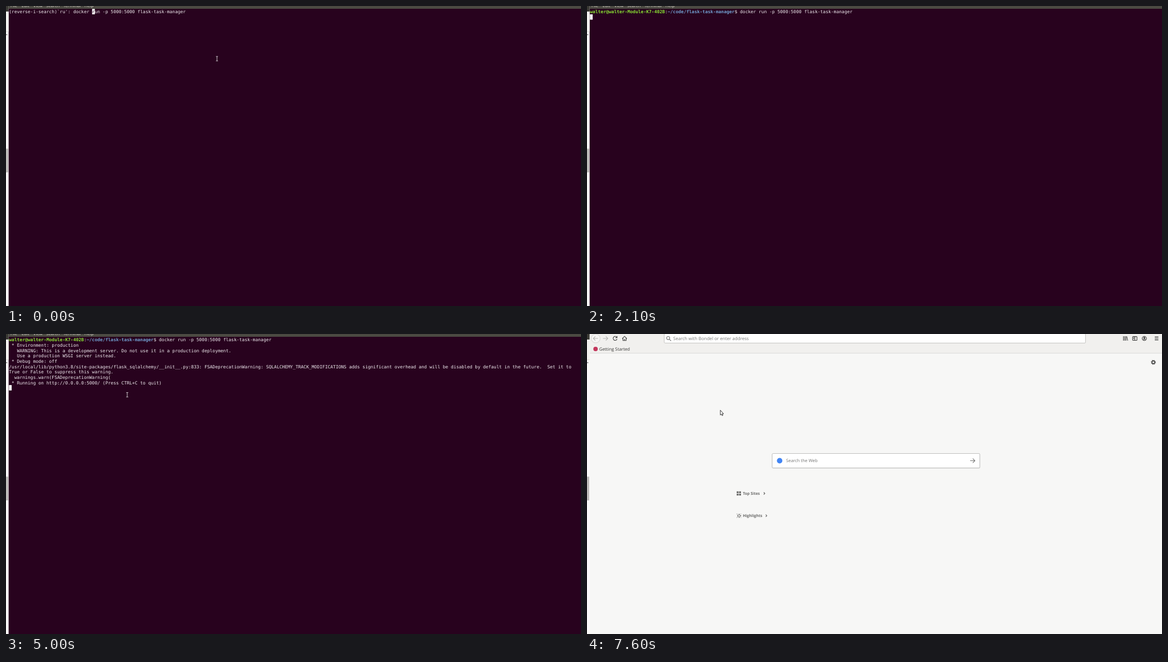
Recreate the animation shown at these times as an HTML page. Size 1034 px wide and 541 px high, loop 8000 ms.

```html
<!DOCTYPE html>
<html lang="en">
<head>
<meta charset="utf-8">
<title>Starting a container</title>
<style>
  html, body { margin: 0; width: 100%; height: 100%; overflow: hidden; background: #28021e; }
  svg { display: block; width: 1034px; height: 541px; }
  text { white-space: pre; text-rendering: geometricPrecision; }
  .ui { font-family: "Open Sans", "Noto Sans", sans-serif; }
  #rows, #under { font: 8.01px "DejaVu Sans Mono", "Liberation Mono", monospace; fill: #f0ecef; }
  #under { fill: #28021e; }
  .user { fill: #8ae234; font-weight: bold; }
  .path { fill: #729fcf; font-weight: bold; }
  .icon { fill: none; stroke: #3d3d3c; stroke-width: 1.1; }
  .dim { stroke: #b5b4b2; }
</style>
</head>
<body>
<svg viewBox="0 0 1034 541" xmlns="http://www.w3.org/2000/svg">
  <g id="terminal">
    <rect width="1034" height="541" fill="#28021e"/>
    <rect width="1034" height="5" fill="#4b4a42"/>
    <g id="menu" class="ui" font-size="7.7" fill="#dfdbd2"></g>
    <g id="rows"></g>
    <rect id="caret" width="5" height="10"/>
    <text id="under"></text>
    <g id="beam" fill="none">
      <path d="M-1.8 -4H1.8M0 -4V4M-1.8 4H1.8" stroke="#d8d5d7" stroke-width="0.9"/>
    </g>
  </g>

  <g id="browser" class="ui">
    <rect width="1034" height="541" fill="#f7f7f6"/>
    <rect width="1034" height="34.5" fill="#f1f0ee"/>
    <path d="M5 34.6H1034" stroke="#d9d8d6" stroke-width="0.9"/>
    <rect x="138.9" y="-0.5" width="757.6" height="16.8" rx="1.5" fill="#fff" stroke="#bebdba" stroke-width="0.9"/>
    <circle cx="15.6" cy="8" r="8" fill="#f5f4f3" stroke="#cdccca" stroke-width="0.8"/>
    <g class="icon">
      <path class="dim" d="M20 8H11.4M15 4.3L11.3 8L15 11.7M28.8 8H37.4M33.8 4.3L37.5 8L33.8 11.7"/>
      <path d="M53.4 5.6A3.6 3.6 0 1 0 54 9.2M54 3.8V6.6H51.2"/>
      <path d="M63.3 8.3L67.5 4.2L71.7 8.3M64.7 7.4V11.8H70.3V7.4M67.5 11.8V9"/>
      <g stroke="#777"><circle cx="146" cy="7.3" r="2.8"/><path d="M148.1 9.4L151.2 12.5"/></g>
      <path d="M964.7 4V12M967 4V12M969.2 4V12M970.7 4.4L972.3 12"/>
      <rect x="981.2" y="4.6" width="7.8" height="6.9" rx="1"/>
      <path d="M985 5V11.5M982.4 6.8H984M982.4 8.5H984"/>
      <circle cx="1002.2" cy="8" r="3.8"/>
      <circle cx="1002.2" cy="7" r="1.2" fill="#3d3d3c"/>
      <path d="M999.8 10.5Q1002.2 8.5 1004.6 10.5"/>
      <path d="M1021 5.4H1027.5M1021 8H1027.5M1021 10.6H1027.5"/>
    </g>
    <text x="155" y="11" font-size="8.04" fill="#777776">Search with Bondel or enter address</text>
    <circle cx="15.4" cy="27" r="4" fill="#c3365c"/>
    <text x="22" y="29.6" font-size="7.8" fill="#383837">Getting Started</text>

    <g class="icon">
      <circle cx="1018.5" cy="51" r="2.5" stroke-width="1.4"/>
      <circle cx="1018.5" cy="51" r="3.7" stroke-width="1.3" stroke-dasharray="1.45 1.456"/>
    </g>

    <rect x="332.6" y="216" width="374.4" height="26.4" rx="2" fill="#dededd"/>
    <rect x="333" y="215.5" width="373.4" height="26" rx="1.6" fill="#fff" stroke="#b0b0af" stroke-width="0.8"/>
    <circle cx="346.4" cy="228.5" r="4.9" fill="#4285f4"/>
    <text x="358" y="231.2" font-size="7.8" fill="#747473">Search the Web</text>
    <path class="icon" style="stroke:#747473" d="M689 228.5H697.5M693.7 224.6L697.6 228.5L693.7 232.4"/>

    <g fill="#6a6a69" font-size="6.95" font-weight="bold">
      <path d="M269.2 283.8h3.4v3.3h-3.4zM273.5 283.8h3.4v3.3h-3.4zM269.2 288h3.4v3.3h-3.4zM273.5 288h3.4v3.3h-3.4z"/>
      <text x="280.2" y="290">Top Sites</text>
      <text x="280.2" y="330.2">Highlights</text>
    </g>
    <g class="icon" style="stroke:#5d5d5c">
      <path d="M317.8 285.5L319.8 287.5L317.8 289.5M321.4 325.7L323.4 327.7L321.4 329.7"/>
      <path stroke-width="0.9" d="M273.6 324.2L274.6 326.8L277.2 327.8L274.6 328.8L273.6 331.4L272.6 328.8L270 327.8L272.6 326.8ZM269.3 324.2L271 325.7M269.3 331.3L271 329.8M276 325.2L277 324.2M276 330.4L277 331.4"/>
    </g>
    <path d="M239.8 137.4V146.2L241.7 144.4L243 147.3L244.4 146.6L243.1 143.9H245.6Z" fill="#fff" stroke="#222" stroke-width="0.9"/>
  </g>

  <g id="edge">
    <rect width="4.7" height="541" fill="#fbfbfa"/>
    <rect y="10" width="4.7" height="36" fill="#f3f2f0"/>
    <rect width="4.7" height="10" fill="#3a3934"/>
    <path d="M0 46.4H4.7" stroke="#d3d2cf" stroke-width="0.8"/>
    <path d="M0 52.3L1.2 50.4L2.8 52.3Z" fill="#3d3d3c"/>
    <rect y="257.3" width="4" height="42.8" fill="#bdbcb9"/>
  </g>
</svg>

<script>
const LOOP = 8000, LEFT = 5.3, CELL = 4.824, PITCH = 9.643;
const $ = id => document.getElementById(id);

const command = "docker run -p 5000:5000 flask-task-manager";
const prompt = `<tspan class="user">walter@walter-Module-K7-402B</tspan>:` +
  `<tspan class="path">~/code/flask-task-manager</tspan>$ ${command}`;
const search = typed => [`(reverse-i-search)\`${typed}': ${command}`];
const banner = [
  " * Environment: production",
  "   WARNING: This is a development server. Do not use it in a production deployment.",
  "   Use a production WSGI server instead.",
  " * Debug mode: off"
];
const log = [
  "/usr/local/lib/python3.8/site-packages/flask_sqlalchemy/__init__.py:833: FSADeprecationWarning: " +
  "SQLALCHEMY_TRACK_MODIFICATIONS adds significant overhead and will be disabled by default in the future.  Set it to",
  "True or False to suppress this warning.",
  "  warnings.warn(FSADeprecationWarning(",
  " * Running on http://0.0.0.0:5000/ (Press CTRL+C to quit)"
];

// Each entry: start time, then the value held until the next entry.
const screens = [
  [0, { rows: search("ru"), row: 0, col: 31, char: "r" }],
  [500, { rows: search("run"), row: 0, col: 32, char: "r" }],
  [1000, { rows: [prompt], row: 0, col: 64, char: "u" }],
  [2100, { rows: [prompt], row: 1, col: 0, char: "" }],
  [4900, { rows: [prompt, ...banner], row: 5, col: 0, char: "" }],
  [5000, { rows: [prompt, ...banner, ...log], row: 9, col: 0, char: "" }]
];
const carets = [
  [0, "on"], [1400, "off"], [2000, "on"], [2700, "off"], [3300, "on"], [3900, "off"],
  [4500, "on"], [5500, "off"], [5700, "on"], [6300, "off"], [7000, "on"], [7500, "hollow"]
];
const pointer = [
  [0, [379.4, 95]], [500, null], [3700, [379.4, 95]], [3800, [290, 92]], [3900, [213, 94]],
  [4500, [218, 109.6]], [6700, [228, 125.5]], [7000, [240.5, 138.6]]
];
const at = (track, t) => track.reduce((held, [start, value]) => t >= start ? value : held, null);
const show = (el, on) => el.setAttribute("display", on ? "inline" : "none");
const place = (el, attrs) => { for (const k in attrs) el.setAttribute(k, attrs[k]); };
const baseline = row => 13.4 + row * PITCH;

const menu = [["File", 8], ["Edit", 28], ["View", 49], ["Search", 72.3], ["Terminal", 103], ["Help", 141]];
$("menu").innerHTML = menu.map(([name, x]) => `<text x="${x}" y="2.1">${name}</text>`).join("");

let shown = null;
function drawRows(screen) {
  if (screen === shown) return;
  shown = screen;
  $("rows").innerHTML = screen.rows
    .map((line, i) => `<text x="${LEFT}" y="${baseline(i)}">${line}</text>`).join("");
}

function drawCaret(screen, mode) {
  const { row, col, char } = screen, hollow = mode === "hollow";
  const x = LEFT + col * CELL;
  show($("caret"), mode !== "off");
  place($("caret"), {
    x: hollow ? 5.5 : x, y: 5.3 + row * PITCH + (hollow ? 0.4 : 0),
    width: hollow ? 4.6 : 4.9, height: hollow ? 9 : 9.7,
    fill: hollow ? "none" : "#fff", stroke: hollow ? "#e4dfe2" : "none", "stroke-width": 0.8
  });
  place($("under"), { x, y: baseline(row) });
  $("under").textContent = mode === "on" ? char : "";
}

function render(t) {
  const web = t >= 7600, screen = at(screens, t), mouse = at(pointer, t);
  show($("terminal"), !web);
  show($("browser"), web);
  drawRows(screen);
  drawCaret(screen, at(carets, t));
  show($("beam"), mouse);
  if (mouse) place($("beam"), { transform: `translate(${mouse})` });
}

const begin = performance.now();
function tick() {
  render((performance.now() - begin) % LOOP);
  requestAnimationFrame(tick);
}
tick();
</script>
</body>
</html>
```
